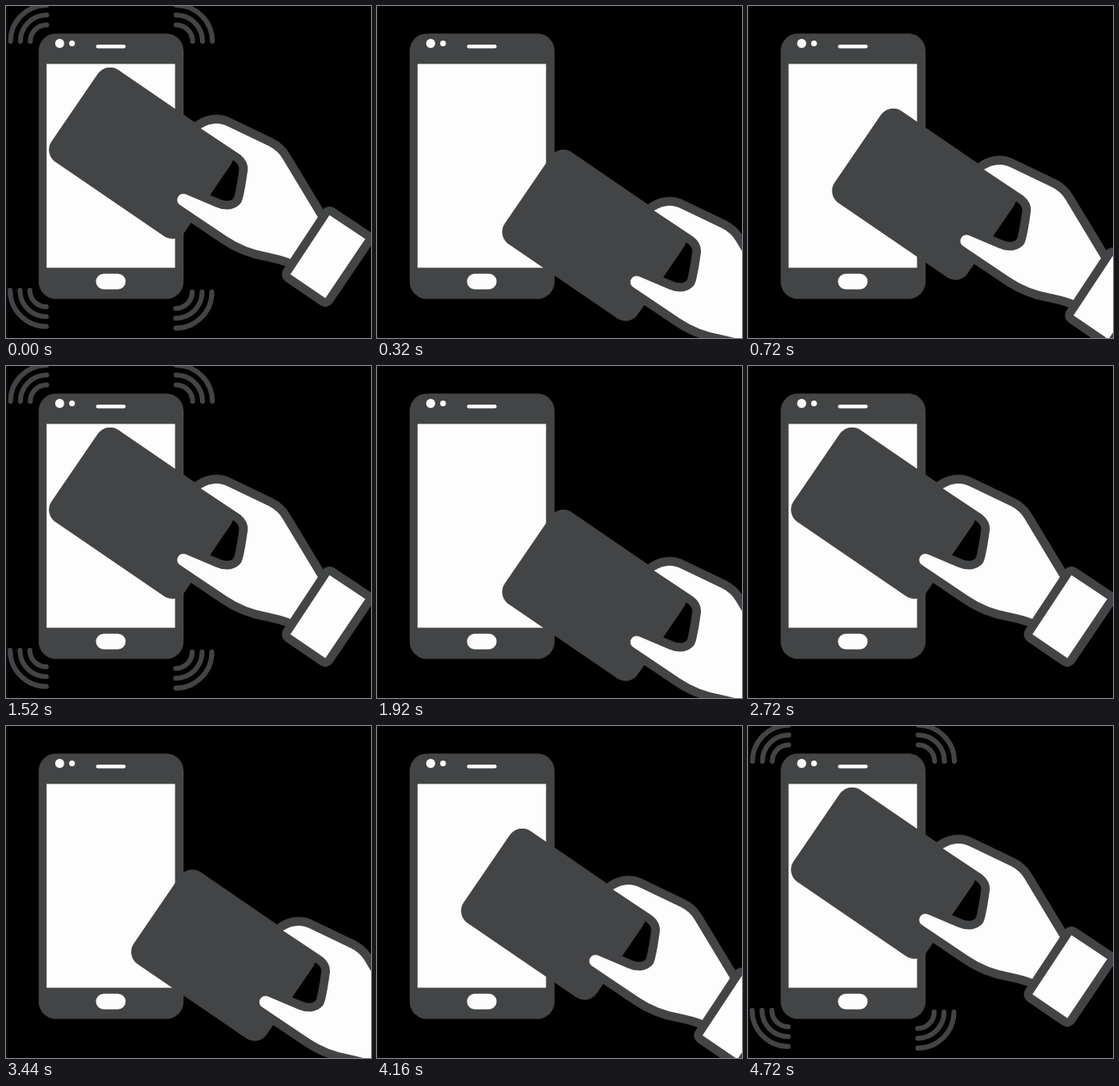
Write an HTML page that moves like this. It is 444 by 404 pixels and loops after 4960 ms.

```html
<!DOCTYPE html>
<html lang="en">
<head>
<meta charset="utf-8">
<title>Contactless tap</title>
<style>
  html, body { margin: 0; width: 100%; height: 100%; overflow: hidden; background: #000; }
  svg { display: block; width: 444px; height: 404px; }
  .dark { fill: #434445; }
  .white { fill: #fdfdfd; }
  .outlined { fill: #fdfdfd; stroke: #434445; stroke-width: 21; stroke-linejoin: round; paint-order: stroke; }
  #waves { fill: none; stroke: #434445; stroke-width: 6; stroke-linecap: round; }
</style>
</head>
<body>
<svg viewBox="0 0 444 404">
  <rect width="2" height="404" fill="#0a0a0c"/>
  <g id="phone">
    <rect class="dark" x="39.7" y="33.5" width="176.3" height="323" rx="21"/>
    <g class="white">
      <rect x="49.4" y="70.5" width="156.2" height="248"/>
      <circle cx="65.3" cy="45.5" r="5.5"/>
      <circle cx="80.3" cy="45.5" r="3.5"/>
      <rect x="109.5" y="47" width="36" height="4.5" rx="2.2"/>
      <rect x="109.5" y="325.7" width="36" height="19" rx="9.5"/>
    </g>
  </g>
  <g id="waves"></g>
  <g id="hand">
    <rect class="dark" width="196" height="135.5" rx="18" transform="translate(121.8 67.7) rotate(34.4)"/>
    <path class="outlined" d="M237 149 Q254 138 271 147 L320 170.500 Q330 175.500 336 185
      L380 258 L349 309 Q336 303.500 318 300 Q290 295 268 280 L213 243
      A7.500 7.500 0 0 1 218.500 229 L255 244.500 Q265 249 274 247 Q286 244 288 234
      Q291 222 294 200 Q295 189 285 181 Z"/>
    <path class="outlined" d="M393.500 254.500 L437 283.500 L388.500 355.500 L346 326.500 Z"/>
  </g>
</svg>
<script>
  const LOOP = 4960;
  // [start ms, diagonal hand offset, waves shown]
  const poses = [
    [0, 0, true],
    [80, 100], [640, 50], [1120, 0], [1520, 0, true],
    [1920, 100], [2240, 50], [2720, 0], [3040, 0, true],
    [3440, 100], [3920, 50], [4320, 0], [4640, 0, true]
  ];
  const hand = document.getElementById('hand');
  const waves = document.getElementById('waves');

  // Three quarter circles at each corner of the phone: centre, then outward direction
  const corners = [
    [49.5, 43, -1, -1], [207, 43, 1, -1],
    [49, 346, -1, 1], [206.5, 348, 1, 1]
  ];
  for (const [x, y, sx, sy] of corners)
    for (const r of [20, 32, 44]) {
      const arc = document.createElementNS('http://www.w3.org/2000/svg', 'path');
      arc.setAttribute('d', `M${x + sx * r} ${y}A${r} ${r} 0 0 ${sx * sy > 0 ? 1 : 0} ${x} ${y + sy * r}`);
      waves.append(arc);
    }

  function draw() {
    const t = performance.now() % LOOP;
    const [, offset, ringing] = poses.findLast(([start]) => start <= t);
    hand.setAttribute('transform', `translate(${offset} ${offset})`);
    waves.setAttribute('visibility', ringing ? 'visible' : 'hidden');
    requestAnimationFrame(draw);
  }
  draw();
</script>
</body>
</html>
```
